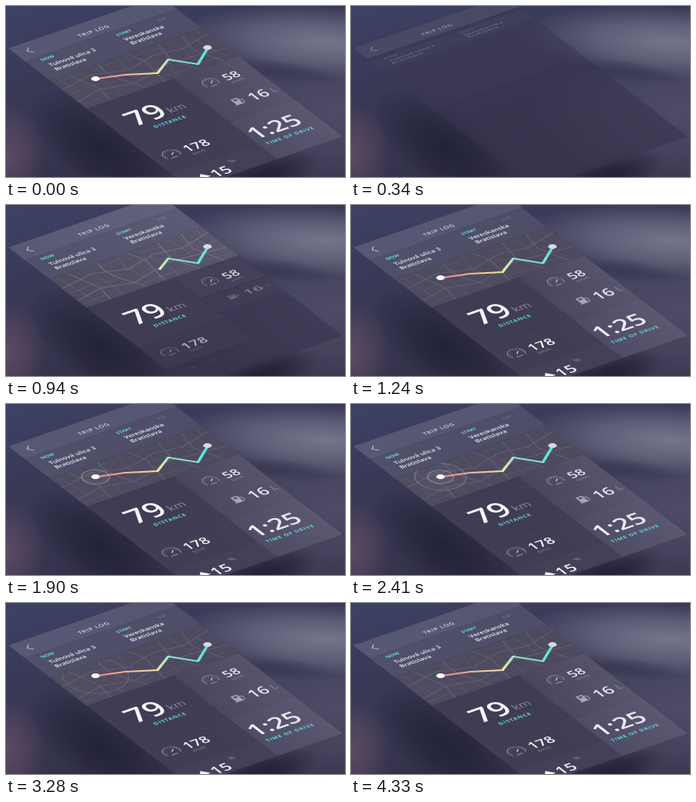
Write an HTML page with a canvas that moves like this. It is 424 px wide and 214 px high and loops after 4.36 s.

```html
<!DOCTYPE html>
<html lang="en">
<head>
<meta charset="utf-8">
<title>Trip log</title>
<style>
  html, body { margin: 0; width: 100%; height: 100%; overflow: hidden; background: #3d3a57; }
  canvas { display: block; width: 424px; height: 214px; }
</style>
</head>
<body>
<canvas width="424" height="214"></canvas>
<script>
const ctx = document.querySelector('canvas').getContext('2d');
const LOOP = 4360, WIDTH = 190, SPLIT = 108, BOTTOM = 326;
const WHITE = '#f5f4fa', CYAN = '#5fdcde', DIM = '#8d899f';
const clamp = x => Math.max(0, Math.min(1, x));
const ramp = (t, start, span) => clamp((t - start) / span);
const easeOut = p => 1 - (1 - p) ** 2;

// Tilted screen plane: u runs along the text, v down the phone
const toPlane = () => ctx.setTransform(1, -.345, .7, .54, 3, 53);
const toStage = () => ctx.setTransform(1, 0, 0, 1, 0, 0);

function glow(x, y, rx, ry, rgb, alpha, turn = 0) {
  ctx.save();
  ctx.translate(x, y);
  ctx.rotate(turn);
  ctx.scale(rx, ry);
  const g = ctx.createRadialGradient(0, 0, 0, 0, 0, 1);
  g.addColorStop(0, `rgba(${rgb},${alpha})`);
  g.addColorStop(.5, `rgba(${rgb},${alpha * .6})`);
  g.addColorStop(1, `rgba(${rgb},0)`);
  ctx.fillStyle = g;
  ctx.fillRect(-1, -1, 2, 2);
  ctx.restore();
}

function text(str, u, v, size, color = WHITE, weight = 600, gap = 0) {
  ctx.font = `${weight} ${size}px "Open Sans", "Noto Sans", sans-serif`;
  ctx.letterSpacing = gap + 'px';
  ctx.fillStyle = color;
  ctx.fillText(str, u, v);
}

function stroke(path, color, width) {
  ctx.strokeStyle = color;
  ctx.lineWidth = width;
  ctx.stroke(new Path2D(path));
}

function gauge(u, v, r) {
  ctx.strokeStyle = '#8f8ba1';
  ctx.lineWidth = 1;
  ctx.beginPath();
  ctx.arc(u, v, r, Math.PI * .8, Math.PI * 2.2);
  ctx.stroke();
  ctx.setLineDash([1, 2.2]);
  ctx.beginPath();
  ctx.arc(u, v, r - 2.5, Math.PI * .9, Math.PI * 2.1);
  ctx.stroke();
  ctx.setLineDash([]);
  stroke(`M${u} ${v + 1}l4 -4`, '#c4c1d0', 1.3);
  stroke(`M${u - 4} ${v + 6}h8`, '#8f8ba1', 1.6);
}

function nav() {
  stroke('M18 10l-5 5 5 5', '#c9c6d6', 1);
  text('TRIP LOG', 74, 22, 7.6, '#d6d3e0', 600, .6);
}

function address() {
  text('NOW', 14.5, 39.5, 6.4, CYAN, 700);
  text('Tulnová ulica 3', 16.5, 52.5, 8);
  text('Bratislava', 16.5, 62.5, 8);
  text('START', 108, 41, 6.2, CYAN, 700);
  text('Vereskanska', 110, 53, 8);
  text('Bratislava', 111, 62.5, 8);
  text('8:00', 160, 40, 5, '#77738b');
}

const roads = 'M0 96L42 88 80 101 118 91 150 97 190 86M0 124L34 116 70 126 122 112 190 120' +
  'M22 74L34 116 30 140M60 74Q52 98 70 126L76 140M96 74L104 96 98 140M134 74L128 108 142 140' +
  'M164 74L158 104 172 140';
const lanes = 'M8 74L14 124M0 108L32 106 60 112M42 88L48 120 45 140M80 101L84 123M50 82L78 80 96 85' +
  'M104 103L130 104M108 80L132 84M112 92L114 114M145 76L150 97 148 117M150 108L190 103M172 90L176 119' +
  'M0 133L30 130M76 133L100 130 136 133M144 129L190 132M84 74L78 101M182 74L180 88M118 120L116 140';

function rings(t) {
  for (const start of [1300, 1850]) {
    const p = ramp(t, start, 1600);
    if (p <= 0 || p >= 1) continue;
    ctx.beginPath();
    ctx.arc(41, 97, 38 * p, 0, 7);
    ctx.fillStyle = `rgba(190,185,210,${.1 * (1 - p)})`;
    ctx.fill();
    ctx.strokeStyle = `rgba(190,185,210,${.5 * Math.sqrt(1 - p)})`;
    ctx.lineWidth = 1.5;
    ctx.stroke();
  }
}

function map(t) {
  ctx.save();
  ctx.beginPath();
  ctx.rect(0, 74, WIDTH, 66);
  ctx.clip();
  const a = .22 - .1 * ramp(t, 760, 480);
  stroke(roads, `rgba(205,203,215,${a})`, 1.8);
  stroke(lanes, `rgba(205,203,215,${a * .8})`, 1);
  rings(t);
  ctx.restore();
}

function arrow() {
  ctx.fillStyle = WHITE;
  ctx.fill(new Path2D('M18 316L25 307 32 316 27 316 27 326 23 326 23 316Z'));
}

function fuel() {
  ctx.fillStyle = '#aaa6b8';
  ctx.fill(new Path2D('M134 205h8v12h-8zM136 207v3h4v-3z'), 'evenodd');
  stroke('M132.5 217h11M142 208l3 2v6', '#aaa6b8', 1.2);
}

// left, top, width, height, start, duration, colour, content
const cells = [
  [0, 0, WIDTH, 30, 220, 200, '#545570', nav],
  [0, 30, WIDTH, 44, 280, 200, '#4b4b66', address],
  [0, 74, WIDTH, 66, 380, 180, '#494659', map],
  [0, 140, SPLIT, 92, 480, 220, '#413e55', () => {
    text('79', 22, 195.5, 38);
    text('km', 67.5, 193.5, 14.5, DIM, 400);
    text('DISTANCE', 37.5, 209, 7, CYAN, 700, .8);
  }],
  [SPLIT, 140, WIDTH - SPLIT, 50, 760, 220, '#48455d', () => {
    gauge(136, 167, 8.7);
    text('58', 152.5, 172.5, 16.5);
    text('km/h', 155, 180, 6.5, DIM, 400);
  }],
  [0, 232, SPLIT, 58, 800, 220, '#423f56', () => {
    gauge(22, 260, 9.5);
    text('178', 38.5, 265.5, 17.5);
    text('km/h', 41, 273.5, 6.5, DIM, 400);
  }],
  [SPLIT, 190, WIDTH - SPLIT, 50, 860, 220, '#4b4861', () => {
    fuel();
    text('16', 152.5, 219.5, 20);
    text('L', 179.5, 217, 13, DIM, 400);
  }],
  [0, 290, SPLIT, BOTTOM - 290, 920, 240, '#454259', () => {
    arrow();
    text('15', 34.5, 321.5, 19.5);
    text('%', 63, 307, 9, DIM, 400);
  }],
  [SPLIT, 240, WIDTH - SPLIT, BOTTOM - 240, 960, 260, '#4f4c66', () => {
    text('1:25', 111.5, 283, 30.5);
    text('TIME OF DRIVE', 116, 297.5, 7, CYAN, 700, .7);
  }]
];

function drawCell([u, v, w, h, start, span, color, content], t) {
  const p = ramp(t, start, span);
  if (!p) return;
  ctx.save();
  ctx.translate(0, v);
  ctx.scale(1, easeOut(p));
  ctx.translate(0, -v);
  ctx.fillStyle = color;
  ctx.globalAlpha = p * .88;
  ctx.fillRect(u, v, w, h);
  ctx.fillStyle = 'rgba(25,22,42,.18)';
  ctx.fillRect(u, v + h - .7, w, .7);
  if (u) ctx.fillRect(u, v, .7, h);
  ctx.globalAlpha = p;
  content(t);
  ctx.restore();
}

const route = [[172, 110], [146, 130], [125.7, 106], [101, 122], [72, 107], [41, 97]];

function drawRoute(t) {
  const p = ramp(t, 640, 540);
  if (p > 0) {
    const g = ctx.createLinearGradient(41, 0, 172, 0);
    g.addColorStop(0, '#ee7f94');
    g.addColorStop(.47, '#efe7a0');
    g.addColorStop(.68, '#8fe5cf');
    g.addColorStop(1, '#4fe3e0');
    ctx.strokeStyle = g;
    ctx.lineWidth = 3;
    ctx.lineJoin = 'round';
    const length = route.slice(1).reduce((s, [x, y], i) =>
      s + Math.hypot(x - route[i][0], y - route[i][1]), 0);
    ctx.setLineDash([length * p, length]);
    ctx.beginPath();
    route.forEach(q => ctx.lineTo(...q));
    ctx.stroke();
    ctx.setLineDash([]);
  }
}

function dot(x, y, p, color) {
  ctx.fillStyle = color;
  ctx.beginPath();
  ctx.ellipse(x, y, 5.4 * p, 3 * p, 0, 0, 7);
  ctx.fill();
}

function backdrop() {
  const g = ctx.createLinearGradient(0, 0, 60, 214);
  g.addColorStop(0, '#3d4265');
  g.addColorStop(.4, '#3a3a58');
  g.addColorStop(1, '#35334c');
  ctx.fillStyle = g;
  ctx.fillRect(0, 0, 424, 214);
  glow(410, 130, 190, 110, '84,82,108', .8);
  glow(400, 45, 190, 45, '126,127,150', .85, .06);
  glow(345, 82, 75, 14, '52,50,76', .6, .12);
  glow(120, 180, 110, 50, '28,28,48', .75, .65);
  glow(0, 185, 50, 65, '112,84,108', .65);
  glow(320, 216, 75, 26, '28,26,46', .85, -.35);
}

function sheen(t) {
  const fresh = ramp(t, 280, 280) * (1 - ramp(t, 760, 480));
  const g = ctx.createLinearGradient(0, 0, WIDTH, 0);
  g.addColorStop(0, 'rgba(170,172,196,.08)');
  g.addColorStop(1, `rgba(170,168,190,${.06 + .22 * fresh})`);
  ctx.globalAlpha = ramp(t, 280, 280);
  ctx.fillStyle = g;
  ctx.fillRect(0, 0, WIDTH, 140);
  const low = ctx.createLinearGradient(SPLIT, 0, WIDTH, 0);
  low.addColorStop(0, 'rgba(150,146,170,.04)');
  low.addColorStop(1, 'rgba(150,146,170,.2)');
  ctx.globalAlpha = ramp(t, 960, 260);
  ctx.fillStyle = low;
  ctx.fillRect(SPLIT, 140, WIDTH - SPLIT, BOTTOM - 140);
  ctx.globalAlpha = 1;
}

function draw(now) {
  let t = now % LOOP;
  if (t < 30) t = LOOP;   // finished screen shows briefly before the reset
  toStage();
  backdrop();
  toPlane();
  ctx.fillStyle = 'rgba(56,53,79,.6)';
  ctx.fillRect(0, 0, WIDTH, BOTTOM);
  cells.forEach(cell => drawCell(cell, t));
  sheen(t);
  drawRoute(t);
  toStage();
  dot(252, 52, ramp(t, 480, 100), '#d9d7e2');
  dot(112, 91, ramp(t, 1120, 100), '#ffffff');
}

let begin;
function tick(now) {
  begin ??= now;
  draw(now - begin);
  requestAnimationFrame(tick);
}
draw(0);
requestAnimationFrame(tick);
</script>
</body>
</html>
```
